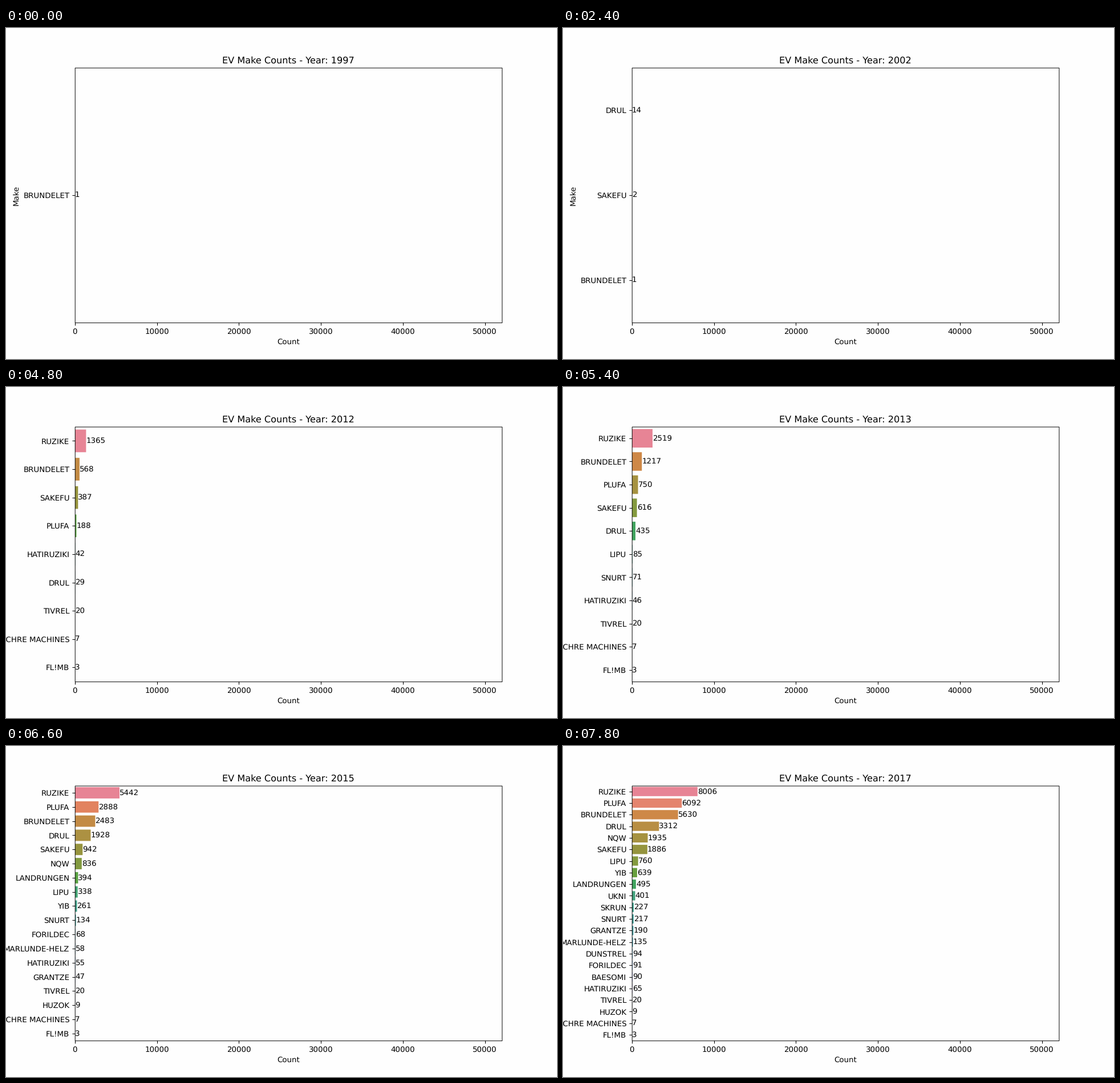
Animation of 966x580 px, one loop 8000 ms. Source, as a matplotlib script:

```python
import colorsys
import math

import numpy as np
import matplotlib.pyplot as plt
from matplotlib.animation import FuncAnimation
from matplotlib.patches import Rectangle
from matplotlib.transforms import ScaledTranslation

DPI = 96.6
W, H = 966, 580
X_MAX = 52078
STEP_FRAMES = 3
FRAMES, INTERVAL = 40, 200
BACK = "#fefefe"

YEARS = [1997, 1998, 1999, 2000, 2002, 2008, *range(2010, 2018)]
KEY_YEARS = [2000, 2010, 2012, 2014, 2016, 2017]

# make: (first year, totals at the first year and at the last key years)
MAKES = {
    "DRUL": (1998, [1, 14, 14, 29, 1319, 2653, 3312]),
    "BRUNDELET": (1997, [1, 1, 568, 2110, 2886, 5630]),
    "SAKEFU": (2002, [2, 2, 387, 898, 987, 1886]),
    "PLUFA": (2008, [23, 47, 188, 1685, 4413, 6092]),
    "RUZIKE": (2011, [743, 1365, 4025, 7072, 8006]),
    "OCHRE MACHINES": (2011, [7]),
    "FL!MB": (2011, [3]),
    "HATIRUZIKI": (2012, [42, 65]),
    "TIVREL": (2012, [20]),
    "LIPU": (2013, [85, 760]),
    "SNURT": (2013, [71, 217]),
    "NQW": (2014, [457, 1935]),
    "FORILDEC": (2014, [58, 91]),
    "MARLUNDE-HELZ": (2014, [31, 135]),
    "HUZOK": (2014, [9]),
    "GRANTZE": (2014, [8, 119, 190]),
    "LANDRUNGEN": (2015, [394, 495]),
    "YIB": (2015, [261, 639]),
    "UKNI": (2016, [214, 401]),
    "SKRUN": (2016, [112, 227]),
    "BAESOMI": (2016, [44, 90]),
    "DUNSTREL": (2017, [94]),
}

XYZ_TO_RGB = np.array([
    [3.2406, -1.5372, -0.4986],
    [-0.9689, 1.8758, 0.0415],
    [0.0557, -0.2040, 1.0570],
])
REF_U, REF_V = 0.19784, 0.46834


def max_chroma(light, hue):
    """Largest LUV chroma inside the RGB gamut."""
    sub = ((light + 16) / 116) ** 3
    best = math.inf
    for m1, m2, m3 in XYZ_TO_RGB:
        for t in (0, 1):
            top1 = (284517 * m1 - 94839 * m3) * sub
            top2 = ((838422 * m3 + 769860 * m2 + 731718 * m1) * light * sub
                    - 769860 * t * light)
            bottom = (632260 * m3 - 126452 * m2) * sub + 126452 * t
            length = top2 / (bottom * math.sin(hue) - top1 * math.cos(hue))
            if length > 0:
                best = min(best, length)
    return best


def husl(degrees, sat=0.9, light=65):
    hue = math.radians(degrees)
    chroma = max_chroma(light, hue) * sat
    u = chroma * math.cos(hue) / (13 * light) + REF_U
    v = chroma * math.sin(hue) / (13 * light) + REF_V
    y = ((light + 16) / 116) ** 3
    xyz = [9 * y * u / (4 * v), y, y * (12 - 3 * u - 20 * v) / (4 * v)]
    lin = np.clip(XYZ_TO_RGB @ xyz, 0, 1)
    return np.where(lin <= 0.0031308, 12.92 * lin,
                    1.055 * lin ** (1 / 2.4) - 0.055)


def palette(n):
    """Evenly spaced hues, slightly desaturated."""
    colors = []
    for k in range(n):
        h, l, s = colorsys.rgb_to_hls(*husl((k / n + 0.01) % 1 * 359))
        colors.append(colorsys.hls_to_rgb(h, l, s * 0.75))
    return colors


def total(year, first, totals):
    """Quadratic growth between the key years."""
    keys = [first, *KEY_YEARS[len(KEY_YEARS) - len(totals) + 1:]]
    return round(np.interp(year, keys, np.sqrt(totals)) ** 2)


def ranking(year):
    rows = [(make, total(year, first, totals))
            for make, (first, totals) in MAKES.items() if year >= first]
    return sorted(rows, key=lambda row: -row[1])


plt.rcParams["font.family"] = "DejaVu Sans"
plt.rcParams["text.hinting"] = "none"
fig, ax = plt.subplots(figsize=((W + 1e-6) / DPI, (H + 1e-6) / DPI), dpi=DPI,
                       facecolor=BACK)
fig.subplots_adjust(left=0.125, right=0.9, bottom=0.11, top=0.88)
half_pixel = ScaledTranslation(0.48 / DPI, -0.48 / DPI, fig.dpi_scale_trans)


def draw_border():
    """A soft outline in place of the pixel-snapped spines."""
    ax.spines[:].set_visible(False)
    ax.add_patch(Rectangle((0, 0), 1, 1, transform=ax.transAxes + half_pixel,
                           fill=False, linewidth=0.72, snap=False,
                           clip_on=False, zorder=2.5))


def draw(frame):
    year = YEARS[frame // STEP_FRAMES]
    makes, counts = zip(*ranking(year))
    n = len(makes)

    ax.clear()
    ax.set_facecolor(BACK)
    ax.barh(range(n), counts, height=0.8, color=palette(n), linewidth=0,
            snap=False)
    for row, count in enumerate(counts):
        ax.text(count, row, str(count), va="center", fontsize=10)
    draw_border()

    ax.set_xlim(0, X_MAX)
    ax.set_ylim(n - 0.5, -0.5)
    ax.set_yticks(range(n), makes)
    ax.set_xlabel("Count")
    # Long make names push the axis label off the stage.
    ax.set_ylabel("Make" if n < 7 else "")
    ax.yaxis.set_label_coords(-0.128, 0.5)
    ax.set_title(f"EV Make Counts - Year: {year}")
    return []


anim = FuncAnimation(fig, draw, frames=FRAMES, interval=INTERVAL,
                     init_func=lambda: draw(0), repeat=True, repeat_delay=0)
plt.show()
```
